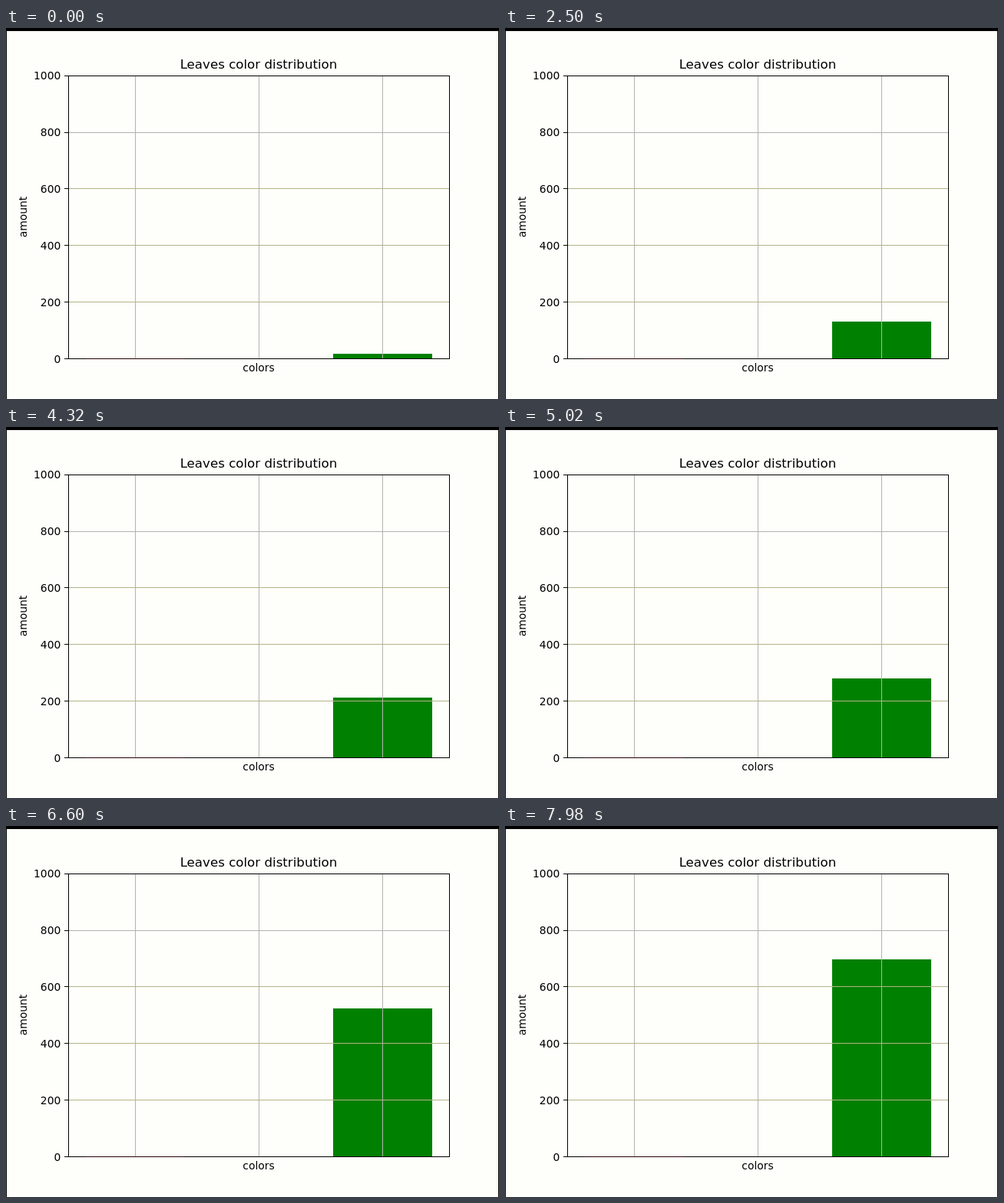
Recreate the animation shown at these times as an HTML page. Size 642x484 px, loop 8000 ms.

```html
<!DOCTYPE html>
<html lang="en">
<head>
<meta charset="utf-8">
<title>Leaves color distribution</title>
<style>
  html, body { margin: 0; width: 100%; height: 100%; overflow: hidden; background: #fefefb; }
  svg { display: block; width: 642px; height: 484px; }
  text { font: 13.89px "DejaVu Sans", sans-serif; fill: #000; }
  .title { font-size: 16.67px; }
  .mid { text-anchor: middle; }
  .end { text-anchor: end; }
  .gray { fill: #b2b2ae; }
  .olive { fill: #b4b488; }
</style>
</head>
<body>
<svg viewBox="0 0 642 484">
  <rect width="642" height="484" fill="#fefefb"/>
  <path d="M0 0H642V484H641V4H1V484H0Z"/>
  <rect id="bar" x="426" width="129" fill="#008000" shape-rendering="crispEdges"/>
  <g id="grid" shape-rendering="crispEdges"></g>
  <path d="M81.5 62.5H577.5V431.5H81.5Z" fill="none" stroke="#000" shape-rendering="crispEdges"/>
  <rect x="104" y="431" width="128" height="1" fill="#280000" shape-rendering="crispEdges"/>
  <g id="labels"></g>
  <text class="title mid" x="329" y="52.5">Leaves color distribution</text>
  <text class="mid" x="329" y="448">colors</text>
  <text class="mid" transform="translate(27 246.5) rotate(-90)">amount</text>
</svg>
<script>
  const LOOP = 8000;
  const BASE = 431;
  const SCALE = 0.3692;
  // [step, amount of green leaves]
  const KEYS = [[0, 17], [29, 47], [53, 130], [74, 130], [107, 279], [142, 522], [171, 696]];

  const byId = id => document.getElementById(id);
  const bar = byId('bar');

  function add(parent, tag, attrs, label) {
    const el = document.createElementNS('http://www.w3.org/2000/svg', tag);
    for (const name in attrs) el.setAttribute(name, attrs[name]);
    if (label !== undefined) el.textContent = label;
    byId(parent).appendChild(el);
  }

  const yOf = amount => Math.round(BASE - amount * SCALE);

  for (const x of [168, 329, 490]) {
    add('grid', 'rect', { x, y: 63, width: 1, height: 368, class: 'gray' });
  }
  for (let n = 0; n <= 1000; n += 200) {
    const y = yOf(n);
    if (n > 0 && n < 1000) {
      add('grid', 'rect', { x: 82, y, width: 495, height: 1, class: n > 600 ? 'gray' : 'olive' });
    }
    add('grid', 'rect', { x: 76, y, width: 5, height: 1 });
    add('labels', 'text', { x: 71.3, y: 437 - n * 0.37, class: 'end' }, n);
  }

  // Three updates every 140 ms: two short ones and a long one.
  function stepAt(t) {
    const p = t % 140;
    return 3 * Math.floor(t / 140) + (p < 20 ? 0 : p < 120 ? 1 : 2);
  }

  function amountAt(step) {
    let i = 1;
    while (i < KEYS.length - 1 && step > KEYS[i][0]) i++;
    const [s0, v0] = KEYS[i - 1];
    const [s1, v1] = KEYS[i];
    return Math.round(v0 + (v1 - v0) * (step - s0) / (s1 - s0));
  }

  function draw(now) {
    const y = yOf(amountAt(stepAt(now % LOOP)));
    bar.setAttribute('y', y);
    bar.setAttribute('height', BASE - y);
    requestAnimationFrame(draw);
  }
  draw(0);
</script>
</body>
</html>
```
